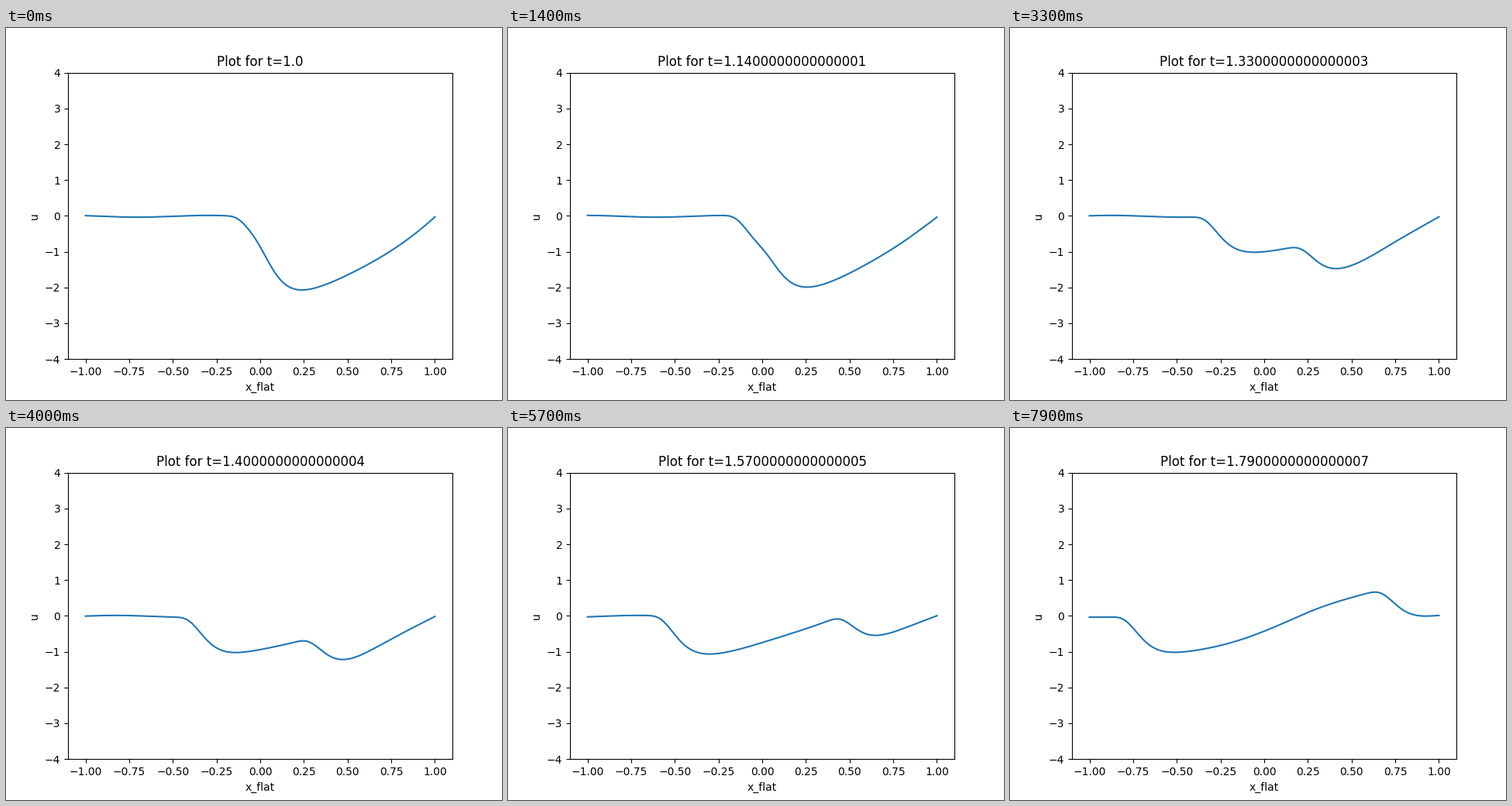
Recreate the animation shown at these times as a matplotlib script. Size 640x480 px, loop 8000 ms.

```python
import numpy as np
import matplotlib.pyplot as plt
from matplotlib.animation import FuncAnimation

FRAMES, STEP_MS = 80, 100
T0, DT = 1.0, 0.01

x = np.linspace(-1, 1, 256)
times = np.arange(T0, 2.0, DT)


def pulse(s, front, steepness, height, bend):
    """Soft drop at the front, then a curved climb back to zero at s = 1."""
    rise = np.exp(-np.exp(-steepness * (s - front)))
    return -rise * (1 - s) * (height + bend * s)


def right_going(s):
    return pulse(s, -0.055, 13.3, 1.135, 1.0)


def left_going(s):
    # Beyond the wall at s = 1 comes the inverted reflection
    inside = pulse(s, 0.06, 13.5, 1.26, 0.87)
    return np.where(s < 1, inside, -right_going(2 - s))


def ripple(tau):
    """Faint slow wave that drifts right across the whole curve."""
    return -0.012 - 0.025 * np.cos(2 * np.pi * (x + 0.7 - 0.68 * tau) / 0.8)


def wave(t):
    tau = t - T0
    return left_going(x + tau) + right_going(x - tau) + ripple(tau)


fig, ax = plt.subplots(figsize=(6.4, 4.8), dpi=100)
line, = ax.plot(x, wave(T0))
ax.set(xlim=(-1.1, 1.1), ylim=(-4, 4), xlabel="x_flat", ylabel="u")
title = ax.set_title("")


def update(k):
    t = float(times[k])
    line.set_ydata(wave(t))
    title.set_text(f"Plot for t={t}")
    return line, title


anim = FuncAnimation(fig, update, frames=FRAMES, interval=STEP_MS,
                     repeat=True, repeat_delay=0, blit=False)
plt.show()
```
